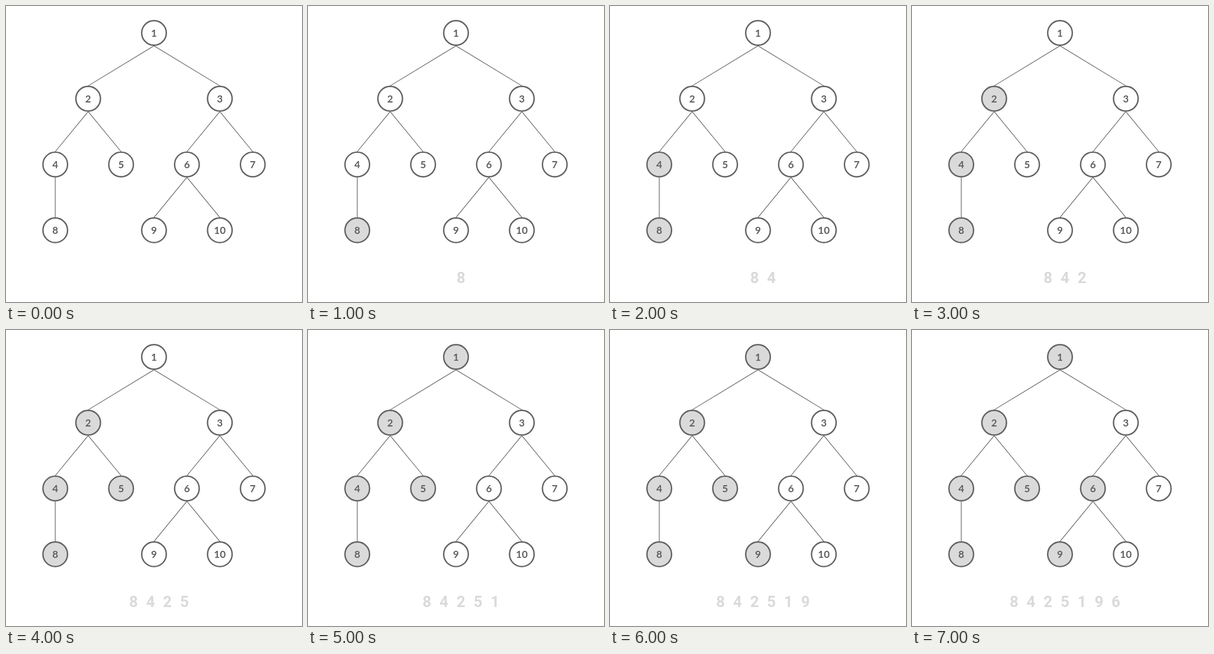
An HTML page that plays this animation: 500x500 px, repeating every 8 s.

```html
<!DOCTYPE html>
<html lang="en">
<head>
<meta charset="utf-8">
<title>In-order traversal</title>
<style>
  html, body { margin: 0; width: 100%; height: 100%; overflow: hidden; background: #fff; }
  svg { display: block; width: 100vw; height: 100vh; }
  line { stroke: #5f5f5f; stroke-width: 1.1; }
  circle { fill: #fff; stroke: #636363; stroke-width: 2.4; }
  circle.seen { fill: #dadada; }
  text { text-anchor: middle; }
  .key { font: 700 17px Lato, sans-serif; fill: #606060; }
  .out { font: 700 25.8px Roboto, sans-serif; fill: #dadada; }
</style>
</head>
<body>
<svg id="stage" viewBox="0 0 500 500"></svg>
<script>
  const STEP = 1000, LOOP = 8000;
  const RADIUS = 20.8, REACH = 21.7;
  const OUT_X = 258.4, OUT_Y = 467.8, PITCH = 28.7;

  // key: [column, row, parent], on a grid of half-columns
  const tree = {
    1: [0, 0, 0],
    2: [-2, 1, 1], 3: [2, 1, 1],
    4: [-3, 2, 2], 5: [-1, 2, 2], 6: [1, 2, 3], 7: [3, 2, 3],
    8: [-3, 3, 4], 9: [0, 3, 6], 10: [2, 3, 6]
  };
  const order = [8, 4, 2, 5, 1, 9, 6];

  const stage = document.getElementById('stage');

  function add(tag, attrs, label) {
    const el = document.createElementNS('http://www.w3.org/2000/svg', tag);
    for (const name in attrs) el.setAttribute(name, attrs[name]);
    if (label !== undefined) el.textContent = label;
    return stage.appendChild(el);
  }

  function place(key) {
    const [col, row] = tree[key];
    return { x: 250 + col * 55.6, y: 45.5 + row * 111.1 };
  }

  for (const key in tree) {
    const parent = tree[key][2];
    if (!parent) continue;
    const a = place(parent), b = place(key);
    add('line', { x1: a.x, y1: a.y + REACH, x2: b.x, y2: b.y - REACH });
  }

  const discs = {};
  for (const key in tree) {
    const { x, y } = place(key);
    discs[key] = add('circle', { cx: x, cy: y, r: RADIUS });
    add('text', { x, y: y + 6, class: 'key' }, key);
  }

  const digits = order.map(key => add('text', { y: OUT_Y, class: 'out' }, key));

  let shown = -1;
  function draw(time) {
    const count = Math.floor((time % LOOP) / STEP);
    if (count === shown) return;
    shown = count;
    order.forEach((key, i) => {
      const seen = i < count;
      discs[key].classList.toggle('seen', seen);
      digits[i].setAttribute('visibility', seen ? 'visible' : 'hidden');
      digits[i].setAttribute('x', OUT_X + (i - (count - 1) / 2) * PITCH);
    });
  }

  const start = performance.now();
  function tick() {
    draw(performance.now() - start);
    requestAnimationFrame(tick);
  }
  tick();
</script>
</body>
</html>
```
